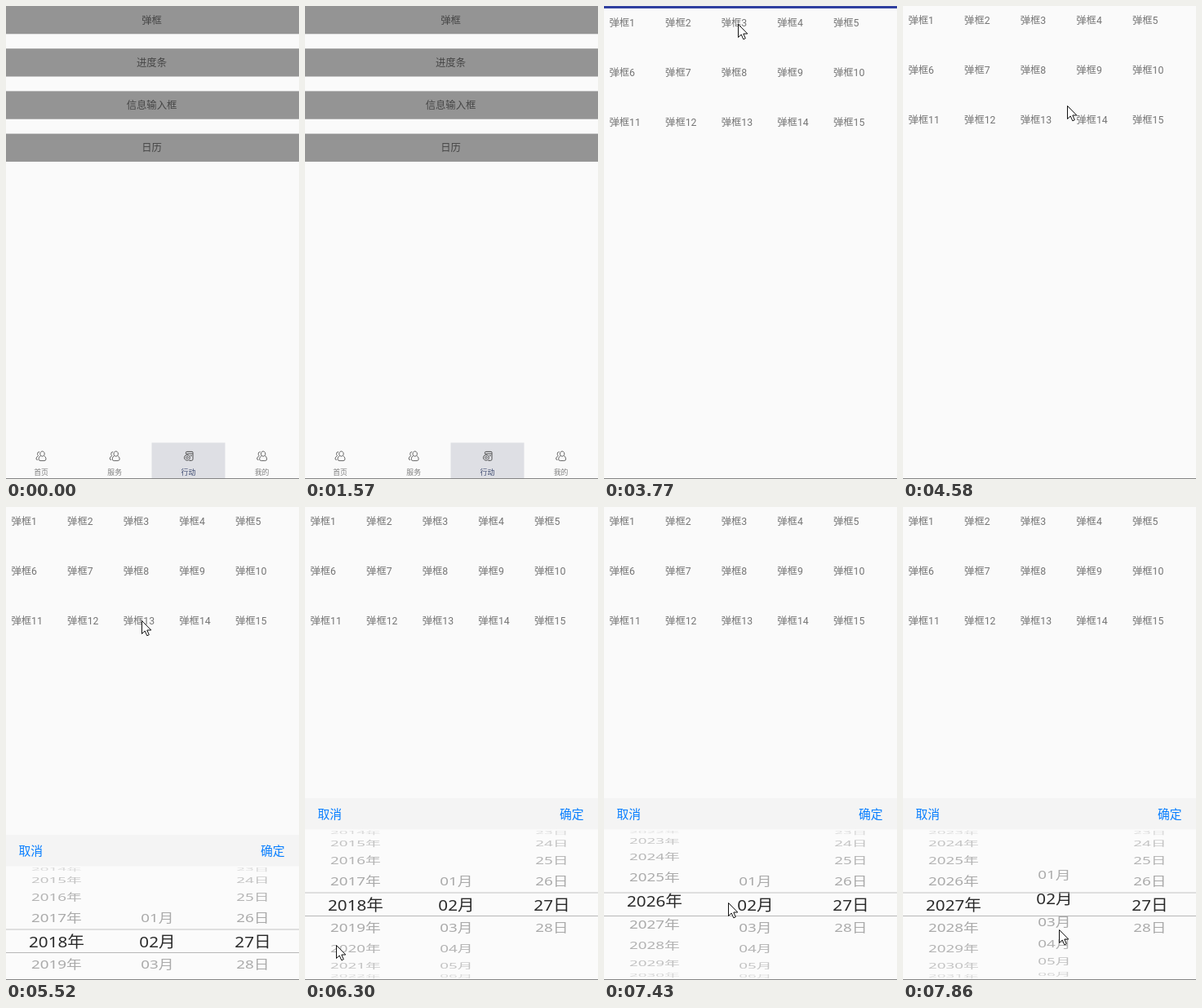
These frames come from a looping animation (359 by 580 pixels, 8000 ms). An HTML page with a canvas:

```html
<!DOCTYPE html>
<html lang="zh-CN">
<head>
<meta charset="utf-8">
<title>选择器</title>
<style>
html, body { margin: 0; width: 100%; height: 100%; overflow: hidden; background: #fafafa; }
canvas { display: block; }
</style>
</head>
<body>
<canvas id="stage" width="359" height="580"></canvas>
<script>
const W = 359, H = 580, LOOP = 8000;
const ctx = document.getElementById('stage').getContext('2d');
const SANS = 'Roboto, "Noto Sans CJK SC", sans-serif';
const WHEEL = '"Noto Sans", "Noto Sans CJK SC", sans-serif';

// The screen refreshes in slow ticks that restart with each burst of activity
const BURSTS = [0, 1000, 2000, 3770, 5400], TICK = 130, SLACK = 20;

function snap(t) {
  const start = BURSTS.findLast(burst => burst <= t);
  return start + Math.floor((t - start + SLACK) / TICK) * TICK;
}

const ramp = (t, from, to) => Math.min(1, Math.max(0, (t - from) / (to - from)));
const easeOut = p => 1 - (1 - p) ** 2;

// Turning points of the pointer: time, x, y
const POINTER = [
  [990, -20, 470], [1130, 151, 533], [1520, 300, 600], [1990, 300, 600],
  [2000, 281, 522], [2260, 207, 167], [2520, 164, 33], [2780, 164, 22],
  [3890, 164, 22], [4150, 177, 24], [4550, 201, 122], [4810, 167, 139],
  [5530, 166, 139], [5790, 175, 149], [6050, 32, 535], [6310, 38, 537],
  [6960, 69, 404], [7480, 180, 512], [7740, 191, 518]
];

function pointerAt(t) {
  const next = POINTER.findIndex(point => point[0] > t);
  if (next === 0) return POINTER[0].slice(1);
  if (next < 0) return POINTER.at(-1).slice(1);
  const [t0, x0, y0] = POINTER[next - 1], [t1, x1, y1] = POINTER[next];
  const p = ramp(t, t0, t1);
  return [Math.round(x0 + (x1 - x0) * p), Math.round(y0 + (y1 - y0) * p)];
}

const slideAt = t => Math.round(223 * (1 - easeOut(ramp(t, 5360, 5668))));
// A steady drag, then a fling that slows down
const yearAt = t => 2018 + 3.85 * ramp(t, 6310, 6960) + 5.15 * easeOut(ramp(t, 6960, 7610));
const monthAt = t => 2 + 0.28 * ramp(t, 7610, 7740);

function rect(x, y, w, h, color) {
  ctx.fillStyle = color;
  ctx.fillRect(x, y, w, h);
}

// y is the visual middle of the glyphs
function label(text, x, y, size, color, align = 'center', family = SANS) {
  ctx.font = `${size}px ${family}`;
  ctx.textAlign = align;
  ctx.fillStyle = color;
  ctx.fillText(text, x, y + size * 0.37);
}

function icon(path, x, y, color) {
  ctx.save();
  ctx.translate(x, y);
  ctx.strokeStyle = color;
  ctx.lineWidth = 1;
  ctx.stroke(new Path2D(path));
  ctx.restore();
}

const PEOPLE = 'M1.5-6a2.7 3.1 0 1 0 .01 0M-.4-.6Q-3 1-3 3.2Q-3 5.6-1 5.6H4Q6 5.6 6 3.2Q6 1 3.6-.6' +
  'M-2-5.4Q-5-5-4.4-2.4Q-4.2-1-3.4-.4Q-6 1-6 3Q-6 4.6-4.2 4.6';
const STACK = 'M-3-3V-4.4Q-3-5.6-1.6-5.6H4.6Q5.6-5.6 5.6-4.4V3.6Q5.6 5.4 4 5.4H1M-3-3H5.4' +
  'M-1.5-1.6a3.4 3.4 0 1 0 .01 0M-1.5.4a1.3 1.3 0 1 0 .01 0M2.4-.6H4.4';

function drawMenu() {
  ['弹框', '进度条', '信息输入框', '日历'].forEach((text, i) => {
    const y = i * 52.2;
    rect(0, y, W, 34.3, '#949494');
    label(text, 178.5, y + 17.2, 12.35, '#454545');
  });
  rect(178.5, 535.5, 90, 44, '#dedfe4');
  ['首页', '服务', '行动', '我的'].forEach((text, i) => {
    const x = 43 + i * 90.2, active = i === 2;
    icon(active ? STACK : PEOPLE, x, 552, active ? '#505050' : '#666');
    label(text, x, 572, 8.9, active ? '#3d4a70' : '#808080');
  });
}

function drawGrid(shift) {
  for (let i = 0; i < 15; i++) {
    label('弹框' + (i + 1), 6.5 + i % 5 * 68.6, 17.3 + Math.floor(i / 5) * 61 + shift, 12.3, '#757575', 'left');
  }
  if (shift) rect(0, 0, W, 3, '#303f9f');
}

// Items lie on a cylinder, ten to the half turn
function drawWheel(x, position, min, max, unit) {
  const radius = 92.5, middle = 487.5, reach = 4.9;
  const first = Math.max(min, Math.ceil(position - reach));
  const last = Math.min(max, Math.floor(position + reach));
  for (let n = first; n <= last; n++) {
    const k = n - position, angle = k * Math.PI / 10;
    const chosen = Math.abs(k) < 0.5;
    ctx.save();
    ctx.translate(x, middle + radius * Math.sin(angle) + (chosen ? 0.6 : 0));
    ctx.scale(chosen ? 1.1 : 1, Math.cos(angle) * (chosen ? 1 : 0.8));
    ctx.globalAlpha = 1 - (Math.abs(k) / 5) ** 2.2;
    label(String(n).padStart(2, '0') + unit, 0, 0, 18.8, chosen ? '#2a2a2a' : '#a8a8a8', 'center', WHEEL);
    ctx.restore();
  }
}

function drawPicker(t) {
  ctx.save();
  ctx.translate(0, slideAt(t));
  rect(0, 357, W, 38.5, '#f4f4f4');
  rect(0, 395.5, W, 185, '#fbfbfb');
  label('取消', 30.2, 376.4, 14.8, '#057dff');
  label('确定', 326.8, 376.4, 14.8, '#057dff');
  drawWheel(62, yearAt(t), 1900, 2100, '年');
  drawWheel(185.5, monthAt(t), 1, 12, '月');
  drawWheel(302.5, 27, 1, 28, '日');
  rect(0, 472.5, W, 1, '#c4c4c4');
  rect(0, 501, W, 1, '#b8b8b8');
  ctx.restore();
}

const ARROW = new Path2D('M.5.5V16.5L4.2 13L6.8 18.8L9.3 17.7L6.8 12H11.8Z');

function drawPointer(t) {
  ctx.save();
  ctx.translate(...pointerAt(t));
  ctx.fillStyle = '#fff';
  ctx.fill(ARROW);
  ctx.strokeStyle = '#111';
  ctx.lineWidth = 1;
  ctx.stroke(ARROW);
  ctx.restore();
}

function draw() {
  const t = performance.now() % LOOP, shown = snap(t);
  rect(0, 0, W, H, '#fafafa');
  if (t < 3770) drawMenu();
  else drawGrid(shown < 3890 ? 3.6 : 0);
  if (t >= 5400) drawPicker(shown);
  rect(0, 579, W, 1, '#858585');
  drawPointer(shown);
  requestAnimationFrame(draw);
}
draw();
</script>
</body>
</html>
```
